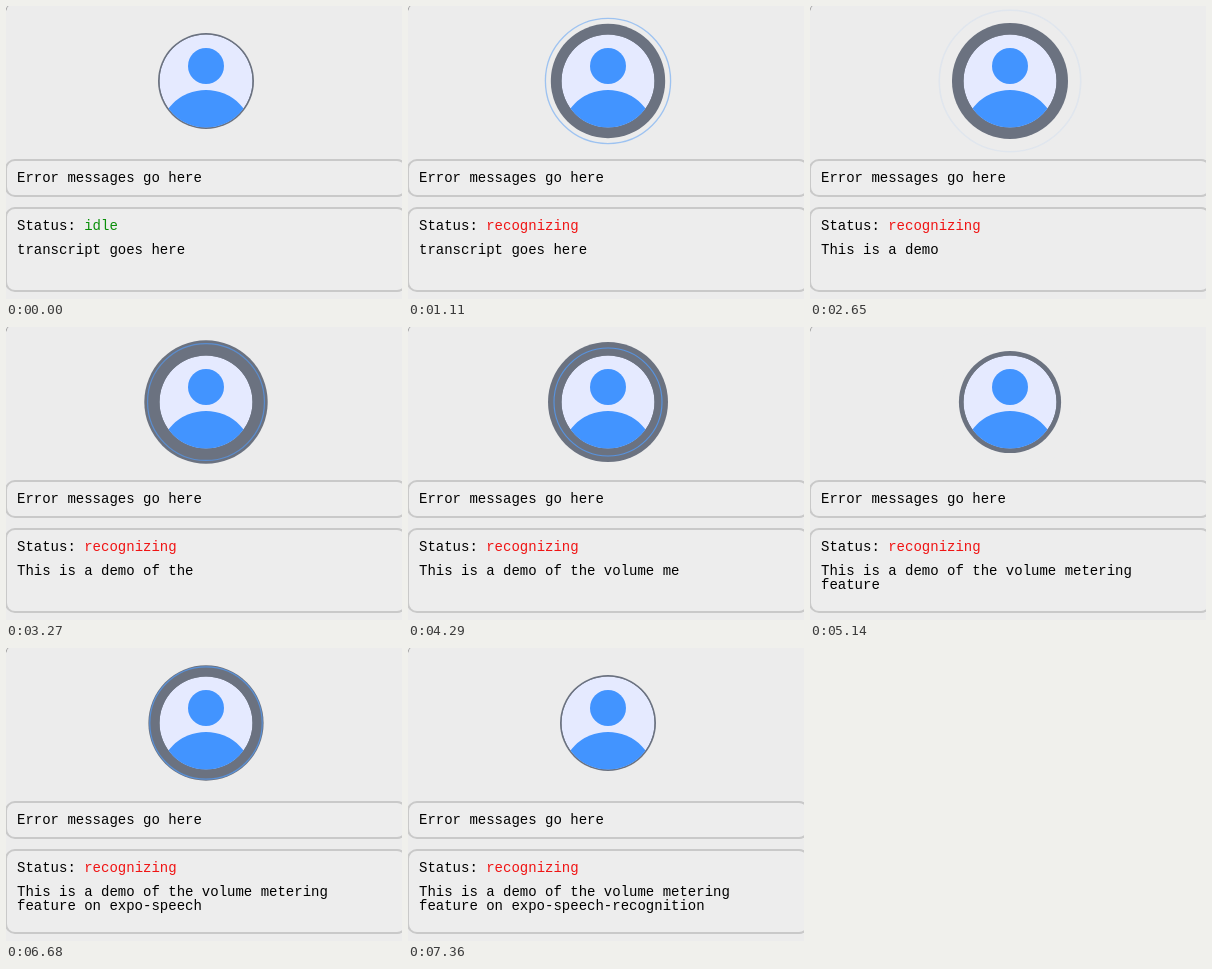
These frames come from a looping animation (396 px wide and 293 px high, 8 s). An HTML page:

```html
<!DOCTYPE html>
<html lang="en">
<head>
<meta charset="utf-8">
<title>Volume metering</title>
<style>
  html, body { margin: 0; width: 100%; height: 100%; overflow: hidden; background: #ececec; }
  svg { display: block; width: 100%; height: 100%; }
  text { font: 14px "Courier New", "Liberation Mono", monospace; white-space: pre; }
  .panel { fill: #ededed; stroke: #c9c9c9; stroke-width: 2; }
</style>
</head>
<body>
<svg viewBox="0 0 396 293">
  <path d="M0 4.5Q.3 1.5 2.5 -.5" fill="none" stroke="#a5a5a5"/>
  <rect class="panel" x="0" y="154" width="400" height="36" rx="9"/>
  <rect class="panel" x="0" y="202" width="400" height="83" rx="9"/>

  <clipPath id="face"><circle cx="200" cy="75" r="46.5"/></clipPath>
  <circle id="halo" cx="200" cy="75" r="48" fill="#6b7280"/>
  <circle id="pulse" cx="200" cy="75" r="48" fill="none" stroke="#539bf5" opacity="0"/>
  <g clip-path="url(#face)">
    <circle cx="200" cy="75" r="46.5" fill="#e5eaff"/>
    <g fill="#4294ff">
      <circle cx="200" cy="60" r="18"/>
      <circle cx="200" cy="131.5" r="47.5"/>
    </g>
  </g>

  <text x="11" y="176">Error messages go here</text>
  <text x="11" y="224">Status: <tspan id="status"></tspan></text>
  <text id="line1" x="11" y="248"></text>
  <text id="line2" x="11" y="262"></text>
</svg>
<script>
const LOOP = 8000, END = 7350, REST = 48, PULSE_MS = 1000;
const $ = id => document.getElementById(id);
const halo = $("halo"), pulse = $("pulse");

const statuses = [[0, "idle"], [50, "starting"], [230, "recognizing"]];

// Each word piece is added to the transcript at its time.
const pieces = [
  [1800, "This is"], [2030, " a"], [2420, " de"], [2620, "mo"], [2900, " of"],
  [3210, " the"], [3640, " volume"], [4130, " me"], [4520, "tering"],
  [4860, "\nfeature"], [5925, " on"], [6350, " expo"], [6600, "-speech"],
  [7020, "-recognition"]
];

const pulseStarts = [825, 1935, 3085, 4190, 5430, 6540];

// Halo radius over time
const volume = [
  [800, 48], [880, 53], [980, 58.5], [1110, 57.2], [1300, 54], [1450, 59],
  [1650, 60.5], [1850, 57], [2080, 61.7], [2300, 59], [2520, 55], [2750, 60],
  [3000, 58], [3270, 61.7], [3480, 59], [3700, 61], [3950, 57], [4150, 59],
  [4290, 60], [4500, 57], [5000, 48], [5070, 48], [5250, 57], [5500, 60.5],
  [5700, 57], [5930, 59.3], [6150, 57], [6350, 60], [6600, 58], [6850, 56.5],
  [7350, 48]
];

const last = (table, t) => table.filter(row => row[0] <= t).pop();

function radiusAt(t) {
  const i = volume.findIndex(row => row[0] > t);
  if (i < 1) return REST;
  const [t0, r0] = volume[i - 1], [t1, r1] = volume[i];
  const k = (t - t0) / (t1 - t0);
  return r0 + (r1 - r0) * k * k * (3 - 2 * k);
}

function setText(id, value) {
  const el = $(id);
  if (el.textContent !== value) el.textContent = value;
}

function drawPulse(t) {
  const start = pulseStarts.filter(s => s <= t).pop();
  const k = (t - start) / PULSE_MS;
  const live = k < 1 && t < END;
  pulse.setAttribute("opacity", live ? (1 - k) ** 2 : 0);
  if (!live) return;
  const scale = 1 + 0.5 * (1 - (1 - k) ** 3);
  pulse.setAttribute("r", (REST - 0.5) * scale);
  pulse.setAttribute("stroke-width", scale);
}

function draw(now) {
  const t = now % LOOP;
  halo.setAttribute("r", radiusAt(t));
  drawPulse(t);

  const status = last(statuses, t)[1];
  setText("status", status);
  $("status").setAttribute("fill", status === "idle" ? "#0a8f0a" : "#f01414");

  const said = pieces.filter(p => p[0] <= t).map(p => p[1]).join("");
  const [first, second = ""] = (said || "transcript goes here").split("\n");
  setText("line1", first);
  setText("line2", second);
}

const begin = performance.now();
function tick() {
  draw(performance.now() - begin);
  requestAnimationFrame(tick);
}
tick();
</script>
</body>
</html>
```
